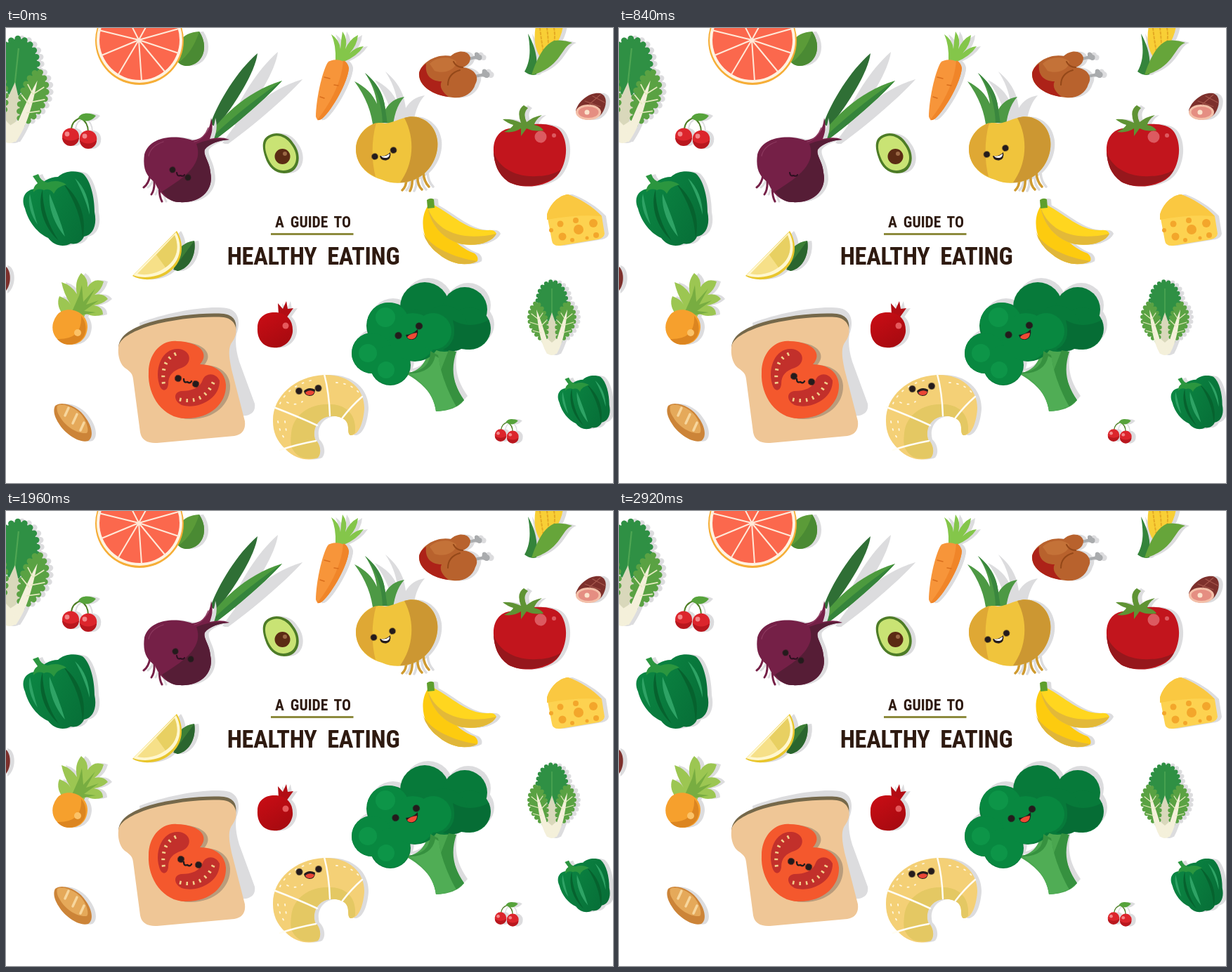
Recreate the animation shown at these times as an HTML page. Size 864 px wide and 648 px high, loop 3 s.

```html
<!DOCTYPE html>
<html lang="en">
<head>
<meta charset="utf-8">
<title>A Guide to Healthy Eating</title>
<style>
html, body { margin: 0; width: 100%; height: 100%; overflow: hidden; background: #fff; }
svg { position: absolute; left: 0; top: 0; width: 864px; height: 648px; }
.s { filter: drop-shadow(6px 0 0 #dcdcde); }
.far { filter: drop-shadow(29px -2px 0 #dcdcde); }
.up { filter: drop-shadow(5px -6px 0 #dcdcde); }
.line { fill: none; stroke-linecap: round; stroke-linejoin: round; }
.scallop { stroke-width: 6; stroke-linecap: round; stroke-dasharray: 0 7; }
text {
  font-family: "Roboto Condensed", "Open Sans Condensed", Roboto, "Open Sans", sans-serif;
  font-stretch: 75%; font-weight: 700; text-anchor: middle; fill: #2e1a10;
}
.look { animation: look 3s ease-in-out infinite; }
.eye { fill: #241b1c; transform-box: fill-box; transform-origin: center; animation: var(--blink) 3s linear infinite; }
@keyframes look {
  0%, 15.33% { transform: none; }
  22.67%, 75.33% { transform: translate(var(--dx), var(--dy)); }
  83.33%, 100% { transform: none; }
}
@keyframes onion {
  0%, 10% { transform: none; }
  14%, 15.33% { transform: scaleY(.18); }
  19.33%, 70% { transform: none; }
  74%, 75.33% { transform: scaleY(0); }
  79.33%, 100% { transform: none; }
}
@keyframes slice {
  0%, 70% { transform: none; }
  74%, 75.33% { transform: scaleY(0); }
  79.33%, 100% { transform: none; }
}
@keyframes beet {
  0%, 23.33% { transform: none; }
  27.33%, 28.67% { transform: scaleY(0); }
  32.67%, 100% { transform: none; }
}
@keyframes croissant {
  0%, 35.33% { transform: none; }
  39.33%, 40.67% { transform: scaleY(.18); }
  44.67%, 100% { transform: none; }
}
@keyframes broccoli {
  0%, 47.33% { transform: none; }
  51.33%, 52.67% { transform: scaleY(.18); }
  56%, 100% { transform: none; }
}
</style>
</head>
<body>
<svg viewBox="0 0 864 648">
  <defs>
    <linearGradient id="pepperFill" x2="1" y2=".5">
      <stop stop-color="#0c8a45"/><stop offset="1" stop-color="#077038"/>
    </linearGradient>
    <linearGradient id="redFill" x2=".6" y2="1">
      <stop stop-color="#cb0d15"/><stop offset="1" stop-color="#a80a10"/>
    </linearGradient>
    <g id="lettuce">
      <path class="scallop" fill="#2f9044" stroke="#2f9044" d="M-14 58C-25 40-23 8 0 4C23 8 25 40 14 58Z"/>
      <path d="M0 14V52" stroke="#4fa653" stroke-width="1.5"/>
      <path fill="#d9d8bb" d="M-9 74L0 48L9 74L2 96H-2Z"/>
      <path fill="#f4f0da" d="M-14 78Q-10 97-6 107Q0 111 6 107Q11 97 14 78Q7 86 0 91Q-7 86-14 78Z"/>
      <g id="sideLeaf">
        <path class="scallop" fill="#5aa243" stroke="#5aa243" d="M10 90C4 68 8 44 22 34C36 44 38 72 10 90Z"/>
        <path fill="#f4f0da" d="M1 106C9 82 14 62 22 44C20 66 17 90 7 107Z"/>
        <path class="line" stroke="#e5ebc0" stroke-width="1.2" d="M19 58L29 50M18 66L31 62M15 77L27 74M19 58L13 49M16 68L8 60"/>
      </g>
      <use href="#sideLeaf" transform="scale(-1 1)"/>
    </g>
    <g id="cherries">
      <path class="line" stroke="#4f7f27" stroke-width="2" d="M93 144Q94 132 106 128Q117 134 117 148"/>
      <path fill="#56a33b" d="M103 128C106 120 120 120 128 125C120 135 110 134 103 128Z"/>
      <circle cx="92" cy="154.5" r="12" fill="#dc252c"/><circle cx="117" cy="158" r="12.3" fill="#dc252c"/>
      <path fill="#b9171e" d="M80 156A12 12 0 0 0 104 156Q92 165 80 156ZM105 160A12 12 0 0 0 129 160Q117 169 105 160Z"/>
      <circle cx="87" cy="151" r="3.4" fill="#f3878a"/><circle cx="112" cy="154" r="3.4" fill="#f3878a"/>
    </g>
    <g id="pepper">
      <path fill="url(#pepperFill)" d="M45 229C28 228 20 242 27 257C32 277 46 293 60 299C68 310 82 313 92 307C101 309 108 304 111 297C124 295 130 280 126 262C126 240 120 216 109 207C98 202 82 204 74 212C62 212 50 219 45 229Z"/>
      <path fill="#06622e" d="M52 230C52 256 60 281 75 303C54 284 44 254 52 230ZM82 222C98 246 108 272 109 300C116 270 104 240 82 222Z"/>
      <path fill="#2ea365" d="M34 236C30 250 36 268 45 280C40 264 37 251 34 236ZM62 236C60 257 70 281 84 297C78 276 70 256 62 236ZM98 214C112 226 119 246 119 266C114 247 107 230 98 214Z"/>
      <path fill="#2b963f" d="M38 211L46 208Q49 218 59 220Q74 215 86 223Q72 226 68 236Q62 227 54 231Q45 227 39 234Q38 226 45 221Z"/>
    </g>
  </defs>

  <g class="s">
    <use href="#lettuce" transform="translate(20 9) rotate(6) scale(1.43)"/>
    <use href="#lettuce" transform="translate(777 357)"/>
    <use href="#cherries"/>
    <use href="#cherries" transform="translate(640.5 473) scale(.69)"/>
    <use href="#pepper"/>
    <use href="#pepper" transform="translate(768 348) scale(.72)"/>
  </g>

  <!-- grapefruit -->
  <path class="s" fill="#5b9b38" d="M243 47C240 18 254 6 275 5C290 27 280 54 256 54Q248 53 243 47Z"/>
  <path fill="#4a8a33" d="M246 49Q266 34 275 5C290 27 280 54 256 54Q248 53 246 49Z"/>
  <circle cx="190" cy="18" r="63" fill="#f6ae37"/>
  <circle cx="190" cy="17" r="61" fill="#fff3e2"/>
  <circle cx="190" cy="17" r="57" fill="#fb684d"/>
  <path stroke="#ffe9d8" stroke-width="2" d="M189 17L132 3M189 17L136 39M189 17L160 66M189 17L193 75M189 17L226 62M189 17L246 36M189 17L246 1M189 17L215-30M189 17L165-30"/>

  <!-- beet -->
  <g class="far">
    <path fill="#2f6f35" d="M291 136C303 104 328 62 358 36C355 62 328 106 299 142Z"/>
    <path fill="#4c9a3e" d="M279 166C302 130 340 91 393 75C372 98 332 134 287 167Z"/>
    <path fill="#35843b" d="M281 167Q330 118 393 75C372 98 332 134 287 167Z"/>
  </g>
  <g class="s">
    <path fill="#752047" d="M292 128C290 146 283 158 265 160C245 152 205 152 197 180C194 202 201 212 212 220C218 235 230 247 246 248C280 250 296 228 291 206C290 190 280 181 283 173C290 164 304 160 318 159C306 154 296 157 290 158C294 148 295 138 292 128Z"/>
    <path class="line" stroke="#752047" stroke-width="3" d="M205 210Q203 222 196 227M211 216Q212 230 207 237M219 224Q217 238 222 247"/>
  </g>
  <path fill="#561d36" d="M271 165C281 192 258 211 222 233C230 244 238 248 246 248C280 250 296 228 291 206C290 190 280 181 283 173C290 164 304 160 318 159Q292 156 271 165Z"/>
  <path class="line" stroke="#8d395f" stroke-width="1.3" d="M288 142Q282 158 268 162M203 182Q206 168 224 162"/>

  <!-- avocado -->
  <g class="s">
    <path fill="#4d7c27" d="M374 153C386 146 402 152 409 164C421 179 419 201 403 206C386 210 374 200 369 184C364 170 364 158 374 153Z"/>
    <path fill="#c9e374" d="M376 156C386 150 399 155 406 166C417 180 415 198 401 202C387 206 377 197 372 183C367 170 368 160 376 156Z"/>
    <circle cx="393.5" cy="183" r="11" fill="#5b2b14"/><circle cx="397" cy="179" r="3" fill="#9a6845"/>
  </g>

  <!-- carrot -->
  <g class="s">
    <path fill="#84c64a" d="M469 47Q470 24 463 9Q475 17 476 30Q477 16 479 5Q487 16 483 30Q489 16 501 10Q500 24 489 36Q498 27 509 26Q500 40 481 48Z"/>
    <path fill="#f7953a" d="M458 49C466 42 486 45 488 57C487 76 465 116 450 129Q443 134 441 126C441 105 449 64 458 49Z"/>
    <path fill="#f08529" d="M480 46Q487 49 488 57C487 76 465 116 450 129Q446 132 443 131C458 112 478 80 480 46Z"/>
    <path class="line" stroke="#d96e1d" stroke-width="1.4" d="M453 70L461 72M473 82L467 81M447 98L453 100"/>
  </g>

  <!-- onion -->
  <path class="far" fill="#4d9944" d="M523 146C521 120 512 98 496 76C512 84 522 94 528 108C526 92 520 78 511 64C530 80 538 96 540 116C546 106 554 100 567 98C556 110 552 126 550 146Z"/>
  <path fill="#3a873e" d="M536 144C537 112 528 86 511 64C530 80 538 96 540 116L544 144Z"/>
  <g class="s">
    <path class="line" stroke="#cf9a2f" stroke-width="3.5" d="M570 214Q570 226 564 231M578 214Q579 225 575 232M586 211Q585 223 592 230M594 206Q595 219 602 226"/>
    <path fill="#f0c43c" d="M540 136C519 130 499 150 498 172C498 195 515 211 535 216C549 222 562 222 575 218C600 212 617 185 614 160C611 135 588 121 567 128C558 130 550 135 540 136Z"/>
  </g>
  <path fill="#dfa834" d="M527 135C509 142 498 156 498 172C498 192 510 204 526 212C520 188 520 160 527 135Z"/>
  <path fill="#cc9732" d="M567 128C588 121 611 135 614 160C617 185 600 212 575 218Q568 220 561 220C580 194 583 158 567 128Z"/>

  <!-- roast chicken -->
  <g class="s">
    <path class="line" stroke="#a9abad" stroke-width="4" d="M655 45L671 41M663 70L681 66"/>
    <path fill="#a9abad" d="M667 36A4 4 0 0 1 674 38A4 4 0 0 1 673 46L667 43ZM678 60A4 4 0 0 1 685 62A4 4 0 0 1 683 71L677 68Z"/>
    <path fill="#b8622d" d="M588 64C592 48 614 36 633 40C642 31 658 31 661 42C661 50 656 54 650 56C668 58 674 70 668 80C664 94 650 101 636 99C616 98 586 86 588 64Z"/>
  </g>
  <path fill="#ad2218" d="M588 64C590 57 594 53 598 51C596 66 604 76 620 76C616 84 622 92 630 98C610 96 587 84 588 64Z"/>
  <path fill="#c47238" d="M603 51C614 40 633 40 641 48C640 60 623 66 610 61Z"/>
  <path class="line" stroke="#944819" stroke-width="2" d="M629 81Q629 65 646 60M650 56Q641 56 637 48"/>

  <!-- corn -->
  <g class="s">
    <path fill="#f8cf36" d="M754-3H793C790 18 778 34 762 44C752 30 751 15 754-3Z"/>
    <path class="line" stroke="#e4a924" stroke-width="2" stroke-dasharray="3 3" d="M760 0Q762 18 765 34M770 0Q772 14 772 30M780 0Q782 10 780 22"/>
    <path fill="#34843b" d="M743 8C752 24 758 42 755 66Q747 69 738 62C748 45 746 25 743 8Z"/>
    <path fill="#66a53a" d="M748 67C756 42 766 24 780 18Q793 16 806 21C790 26 791 56 748 67Z"/>
  </g>

  <!-- ham -->
  <g class="s">
    <path fill="#7d302c" d="M811 117C816 102 832 91 846 93C857 97 855 112 848 122C838 134 812 134 811 117Z"/>
    <ellipse cx="829" cy="120" rx="18" ry="11" fill="#f4c0a9"/><ellipse cx="829" cy="120" rx="14.5" ry="8" fill="#e58e82"/>
    <circle cx="827" cy="120" r="3.5" fill="#fbe3cc"/>
    <path class="line" stroke="#a5574c" stroke-width="1.2" d="M824 104L846 112M835 97L852 106M846 95L830 109"/>
    <path fill="#7d302c" d="M-4 338C8 340 10 368-4 378Z"/>
  </g>

  <!-- tomato -->
  <g class="s">
    <path fill="#c2151d" d="M694 176C693 152 708 140 728 143C745 135 780 133 790 148C802 166 798 195 784 211C768 227 735 230 715 219C700 208 695 194 694 176Z"/>
    <path fill="#96171c" d="M694 176C700 198 725 213 755 211Q775 211 790 202C780 222 737 232 715 219C700 208 695 194 694 176Z"/>
    <path fill="#5f9334" d="M733 143Q723 150 709 148Q721 142 722 138Q713 135 707 130Q720 129 733 135Q726 117 737 110L743 114Q735 121 741 134Q751 126 763 124Q753 131 752 138Q762 140 765 146Q751 148 741 143L733 154Z"/>
  </g>
  <circle cx="761" cy="155" r="8.5" fill="#dc5a60"/><circle cx="780" cy="153" r="3" fill="#dc5a60"/>

  <!-- cheese -->
  <g class="s">
    <path fill="#fdd250" d="M770 266C774 251 787 238 800 237C817 243 836 255 848 268L852 293Q851 299 843 301L789 310Q778 311 777 303Z"/>
    <path fill="#fac841" d="M770 266C774 251 787 238 800 237C817 243 836 255 848 268Q812 265 770 273Z"/>
  </g>
  <g fill="#f3a62b">
    <circle cx="789" cy="279" r="4.5"/><circle cx="811" cy="274" r="4"/><circle cx="815" cy="287" r="7"/><circle cx="792" cy="297" r="5.5"/>
    <circle cx="836" cy="278" r="6"/><circle cx="840" cy="295" r="4"/><circle cx="806" cy="302" r="3"/><circle cx="776" cy="288" r="3"/><circle cx="827" cy="299" r="2.5"/>
  </g>

  <!-- bananas -->
  <g class="s">
    <path fill="#fdcb0f" d="M600 254C588 272 592 306 616 322C634 337 656 340 671 332Q673 326 667 321C636 310 624 284 609 256Z"/>
    <path fill="#e0b63a" d="M593 290C602 312 640 328 671 332C656 340 634 337 616 322Q599 310 593 290Z"/>
    <path fill="#ffd61f" d="M600 254C603 277 620 302 650 308C672 311 692 305 698 293Q696 287 686 288C656 289 636 266 609 252Z"/>
    <path fill="#e3b938" d="M600 254C608 284 642 306 698 293C692 305 672 311 650 308C620 302 603 277 600 254Z"/>
    <path fill="#5e9f2d" d="M599 245Q604 241 609 244L610 256L600 257Z"/>
  </g>

  <!-- lemon -->
  <g class="s">
    <path fill="#3c7f35" d="M236 340C238 320 250 305 268 303C271 320 263 342 244 346Z"/>
    <path fill="#2a652e" d="M238 344L268 303C271 320 263 342 244 346Z"/>
    <path fill="#e9c62d" d="M243 289C255 308 252 334 232 348C217 360 193 361 180 353Z"/>
    <path fill="#fff7cf" d="M242 291C252 309 249 332 230 345C215 356 194 357 181 352Z"/>
    <path fill="#f6e088" d="M240 295C247 312 244 329 227 341C215 350 199 353 187 350Z"/>
    <path fill="#e8d062" d="M240 295C247 312 244 329 227 341L214 323Z"/>
  </g>

  <!-- pineapple -->
  <g class="s">
    <path fill="#9cc652" d="M84 412Q70 396 76 382Q88 386 92 394Q82 378 79 362Q93 366 101 379Q97 361 107 349Q117 356 116 369Q125 355 139 361Q136 373 126 380Q139 377 145 386Q136 394 125 395Q138 397 138 408Q124 413 113 406Q112 416 100 417Z"/>
    <path fill="#78ad41" d="M93 406L104 381L108 366L110 390L127 371L114 394L132 388L111 403L128 405L102 410Z"/>
    <path fill="#f6a02d" d="M80 403C96 397 116 407 116 426C115 446 99 454 83 450C70 444 64 433 67 420Q71 407 80 403Z"/>
    <path fill="#dc8520" d="M107 410C116 420 116 437 106 445C95 454 80 452 73 443Q109 444 107 410Z"/>
  </g>
  <circle cx="102" cy="434" r="5" fill="#fbc267"/>

  <!-- toast -->
  <path fill="#dcdcde" d="M190 420C230 405 285 395 314 399C332 402 334 420 328 436Q325 452 332 475L354 535Q356 549 342 552L200 560Z"/>
  <path fill="#75684a" d="M160 455C161 437 180 427 205 419C240 409 285 405 310 407C324 409 329 418 327 430L163 455Z"/>
  <path fill="#efc696" d="M160 455C161 442 180 432 205 424C240 414 285 410 310 412C329 415 332 434 322 447C315 456 318 472 322 490L340 560Q342 578 325 581L215 591Q194 592 191 576L181 500C180 490 174 488 168 483C161 476 159 464 160 455Z"/>
  <g id="slice">
    <path fill="#b99c7c" transform="translate(6 1)" d="M243 446C220 444 203 465 203 490C201 525 225 556 255 556C290 557 314 535 313 508C312 490 297 479 276 479C290 464 277 447 243 446Z"/>
    <path fill="#f4582d" d="M243 446C220 444 203 465 203 490C201 525 225 556 255 556C290 557 314 535 313 508C312 490 297 479 276 479C290 464 277 447 243 446Z"/>
    <path fill="#c2302b" d="M246 457C224 455 211 482 218 507C221 519 230 518 231 507C231 494 238 488 250 484C266 478 264 459 246 457ZM304 502C298 490 284 491 280 501C276 513 264 517 250 517C238 518 238 531 250 537C273 544 305 528 304 502Z"/>
    <path class="line" stroke="#f2cf8b" stroke-width="5" style="stroke-linecap:butt" stroke-dasharray="2.500 7" d="M242 464Q219 474 225 511M247 529Q281 537 296 503"/>
  </g>

  <!-- pomegranate -->
  <g class="s">
    <path fill="#b20d14" d="M388 408L387 392L394 400L399 389L401 400L409 399L399 413Z"/>
    <path fill="url(#redFill)" d="M358 427C358 411 370 404 385 405C401 407 409 417 408 433C406 448 393 457 380 455C365 454 357 442 358 427Z"/>
  </g>
  <circle cx="398" cy="424" r="4.5" fill="#e5595c"/>

  <!-- croissant -->
  <path class="s" fill="#f4d076" d="M380 560C379 526 410 496 453 494C489 493 511 515 510 543C508 567 500 581 490 580C483 576 495 557 470 553C446 550 435 569 440 586C447 592 450 605 444 612C432 617 412 615 398 600C385 588 380 575 380 560Z"/>
  <path fill="#e4c863" d="M406 577C409 549 435 534 463 536C486 537 499 552 497 576Q494 580 490 580C483 576 495 557 470 553C446 550 435 569 440 586C447 592 450 605 444 612Q430 615 419 611C403 600 405 590 406 577Z"/>
  <path class="line" stroke="#fffdf4" stroke-width="2.500" d="M453 493Q460 520 461 552M507 525Q492 538 479 555M381 540Q415 553 443 566M390 601Q414 593 441 588"/>
  <path class="line" stroke="#fff7df" stroke-width="1.8" stroke-dasharray="2 9" d="M390 535Q402 510 434 502M400 533Q412 539 422 532M387 560Q390 578 398 586M397 560L399 575M470 505Q490 506 502 519"/>

  <!-- broccoli -->
  <g class="up">
    <path fill="#4aa64f" d="M569 492C590 489 600 475 602 452L641 452C633 478 632 502 652 530Q641 545 612 546C609 524 597 508 569 492Z"/>
    <g fill="#077a3a">
      <circle cx="596" cy="397" r="35"/><circle cx="653" cy="401" r="32"/><circle cx="660" cy="428" r="30"/><circle cx="624" cy="428" r="33"/>
      <circle cx="546" cy="424" r="33"/><circle cx="521" cy="463" r="29"/><circle cx="547" cy="480" r="29"/><circle cx="582" cy="438" r="37"/>
    </g>
  </g>
  <g fill="#088840">
    <circle cx="544" cy="421" r="30"/><circle cx="521" cy="463" r="29"/><circle cx="547" cy="480" r="28"/>
    <circle cx="579" cy="440" r="34"/><circle cx="608" cy="432" r="26"/>
  </g>
  <g fill="#0d9548"><circle cx="540" cy="412" r="14"/><circle cx="515" cy="463" r="13"/><circle cx="541" cy="487" r="12"/></g>
  <path fill="#066d35" d="M622 458Q644 448 636 416Q660 430 687 416C697 441 675 462 648 457Q637 463 622 458Z"/>
  <path fill="#36913f" d="M571 491C594 489 604 479 604 460L615 466L619 487L630 459L641 461C634 483 634 504 652 530L641 539C626 513 614 500 571 491Z"/>
  <path fill="#50ad55" d="M576 492Q606 491 611 467L616 470Q619 498 640 538Q625 546 612 546C609 524 597 508 576 492Z"/>

  <!-- roll -->
  <g class="s">
    <path fill="#cc8438" d="M70 538C80 530 104 539 114 556C124 570 124 584 117 588C104 592 83 577 75 563C68 552 67 544 70 538Z"/>
    <path fill="#e5a95a" d="M73 538C82 533 103 542 111 556C117 566 118 577 114 577C101 578 84 567 77 554Q71 545 73 538Z"/>
    <path class="line" stroke="#f7d69d" stroke-width="3.500" d="M84 552L89 541M95 563L101 550M106 573L111 562"/>
  </g>

  <text x="437" y="284" font-size="21.500" word-spacing="4">A GUIDE TO</text>
  <path stroke="#8d8b3e" stroke-width="3" d="M377 293.5H494.500"/>
  <text x="437.5" y="337" font-size="34.500" word-spacing="7" letter-spacing="-.3">HEALTHY EATING</text>
</svg>

<svg viewBox="0 0 864 648" id="faces">
  <path fill="#241b1c" d="M532 182Q540 184 547 177Q549 187 541 188.500Q533 189 532 182Z"/>
  <path fill="#fff" d="M534 182Q540 184 546 179Q546 185 540 185Q535 185 534 182Z"/>
  <path class="line" stroke="#241b1c" stroke-width="2.4" d="M253 500Q253 506 258 504Q262 507 264 503"/>
  <path class="line" stroke="#2d0f20" stroke-width="2" d="M243 206Q244 212 248 210Q253 212 254 209"/>
  <path fill="#241b1c" d="M424 517Q431 510 440 515Q440 524 432 524Q425 523 424 517Z"/>
  <path fill="#ea4636" d="M426 519Q432 514 439 518Q438 523 432 523Q427 523 426 519Z"/>
  <path fill="#241b1c" d="M569 437Q578 437 586 429Q588 441 579 444Q571 445 569 437Z"/>
  <path fill="#ee4b35" d="M571 440Q575 435 585 434Q585 441 579 443Q573 444 571 440Z"/>
</svg>

<script>
// left eye x, y, right eye x, y, radius, tilt, gaze shift x, y
const faces = {
  onion: [525, 183, 551.5, 174, 4.6, -17, -1.5, -3],
  slice: [245, 499, 270, 507, 4.8, 18, 4, -3],
  beet: [237, 202, 259, 213, 4.4, 25, 4, -2],
  croissant: [417, 517, 444.5, 513, 4.8, -8, .5, -3],
  broccoli: [558.5, 438, 588, 424.5, 5, -24, -4, -1]
};

const eye = (x, y, r, tilt) =>
  `<g transform="translate(${x} ${y}) rotate(${tilt})"><ellipse class="eye" rx="${r}" ry="${r}"/></g>`;

const markup = Object.entries(faces).map(([name, [x1, y1, x2, y2, r, tilt, dx, dy]]) =>
  `<g class="look" style="--blink:${name};--dx:${dx}px;--dy:${dy}px">
    ${eye(x1, y1, r, tilt)}${eye(x2, y2, r, tilt)}
  </g>`).join('');
document.getElementById('faces').insertAdjacentHTML('beforeend', markup);
</script>
</body>
</html>
```
